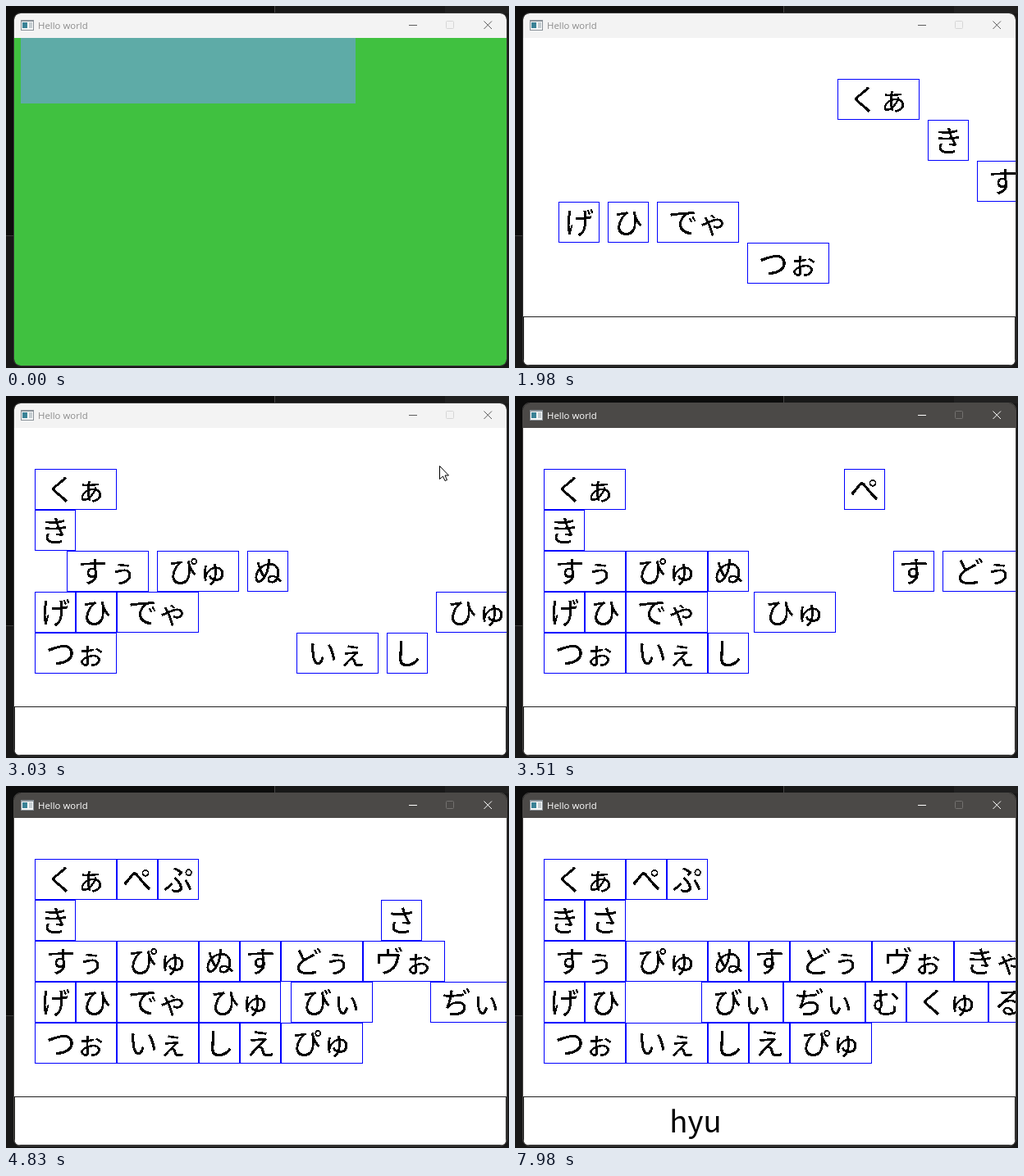
Write an HTML page with a canvas that moves like this. It is 613x442 px and loops after 8000 ms.

```html
<!DOCTYPE html>
<html lang="en">
<head>
<meta charset="utf-8">
<title>Hello world</title>
<style>
  html, body { margin: 0; width: 100%; height: 100%; overflow: hidden; background: #101010; }
  canvas { display: block; }
</style>
</head>
<body>
<canvas id="stage" width="613" height="442"></canvas>
<script>
const ctx = document.getElementById('stage').getContext('2d');
const LOOP = 8000, STEP = 30;
const LEFT = 35, TOP = 89, CELL = 50, GAP = 10;
const SPEED = 0.4655;
const FONT = '36.5px "Noto Sans CJK JP", "Noto Sans CJK", sans-serif';
const LABEL = '11.4px "Open Sans", "Noto Sans", sans-serif';

// Words in spawn order, each followed by its row
const QUEUE = 'げ3 ひ3 でゃ3 つぉ4 くぁ0 き1 すぅ2 ぴゅ2 ぬ2 いぇ4 し4 ひゅ3 ぺ0 す2 どぅ2 ' +
  'ぷ0 え4 ヴぉ2 ぴゅ4 びぃ3 さ1 ぢぃ3 きゃ2 む3 くゅ3 る3';
const REMOVED = { 'でゃ': 5850, 'ひゅ': 7980 };
const TYPED = [[0, ''], [5430, 'd'], [5670, 'dh'], [5850, 'dha'], [7470, 'h'], [7890, 'hy'], [7980, 'hyu']];
const BAR = [[0, 408], [30, 416], [180, 424], [360, 432]];
const SCROLL = [[780, -557], [1980, 0], [3030, 489], [4080, 999], [4830, 1346], [5610, 1709], [8000, 2822]];
const CURSOR = [[2820, 622, 38], [2910, 583, 58], [3030, 528, 85], [3210, 528, 85], [3330, 492, 108]];
const ARROW = new Path2D('M0 0V16L4 12.5L6.5 18L9 17L6.5 11.5H11Z');

// Kana are drawn without smoothing
function sprite(text, w) {
  const c = document.createElement('canvas');
  c.width = w;
  c.height = CELL;
  const g = c.getContext('2d', { willReadFrequently: true });
  g.font = FONT;
  g.textAlign = 'center';
  g.fillText(text, w / 2, 39);
  const img = g.getImageData(0, 0, w, CELL);
  for (let i = 3; i < img.data.length; i += 4) img.data[i] = img.data[i] > 110 ? 255 : 0;
  g.putImageData(img, 0, 0);
  g.strokeStyle = '#00f';
  g.strokeRect(0.5, 0.5, w - 1, CELL - 1);
  return c;
}

function buildWords() {
  const ends = [LEFT, LEFT, LEFT, LEFT, LEFT];
  let start = 53;
  return QUEUE.split(' ').map(item => {
    const text = item.slice(0, -1), row = +item.slice(-1), w = text.length * CELL;
    const word = { row, w, start, stop: ends[row], gone: REMOVED[text] || Infinity, pic: sprite(text, w) };
    ends[row] += w;
    start += w + GAP;
    return word;
  });
}
const words = buildWords();

const latest = (list, t) => list.filter(e => e[0] <= t).pop()[1];

function along(keys, t, k = 1) {
  let i = 1;
  while (i < keys.length - 1 && t > keys[i][0]) i++;
  const a = keys[i - 1], b = keys[i];
  return a[k] + (b[k] - a[k]) * (t - a[0]) / (b[0] - a[0]);
}

function rect(color, x, y, w, h) {
  ctx.fillStyle = color;
  ctx.fillRect(x, y, w, h);
}

function line(color, ...pts) {
  ctx.strokeStyle = color;
  ctx.lineWidth = 1;
  ctx.beginPath();
  for (let i = 0; i < pts.length; i += 4) {
    ctx.moveTo(pts[i], pts[i + 1]);
    ctx.lineTo(pts[i + 2], pts[i + 3]);
  }
  ctx.stroke();
}

function roundPath(x, y, w, h, r) {
  ctx.beginPath();
  ctx.roundRect(x, y, w, h, r);
}

function desktop() {
  rect('#0c0c0c', 0, 0, 613, 442);
  rect('#181818', 327, 0, 286, 442);
  rect('#202020', 535, 0, 78, 9);
  rect('#171717', 0, 281, 327, 161);
  rect('#444', 327, 0, 1, 9);
  rect('#3a3a3a', 0, 280, 10, 1);
}

function titleBar(active) {
  rect(active ? '#4b4947' : '#f3f3f3', 10, 9, 600, 30);
  const ink = active ? '#fff' : '#5c5c5c';
  rect('#8a9299', 18, 17, 16, 13);
  rect('#f4f6f7', 19, 19, 14, 10);
  rect('#3a8296', 20, 20, 6, 7);
  rect('#c4ccd0', 28, 20, 4, 7);
  ctx.font = LABEL;
  ctx.textAlign = 'left';
  ctx.fillStyle = active ? '#fff' : '#8c8c8c';
  ctx.fillText('Hello world', 39, 28);
  line(ink, 491, 23.5, 501, 23.5);
  line(ink, 582.5, 18.5, 592, 28, 592, 18.5, 582.5, 28);
  ctx.strokeStyle = active ? '#73716f' : '#d6d6d6';
  roundPath(536.5, 18.5, 9, 9, 1);
  ctx.stroke();
}

function wordX(word, t) {
  let x = Math.max(word.stop, word.start - along(SCROLL, t));
  for (const o of words)
    if (o.row === word.row && o.stop < word.stop && t >= o.gone)
      x -= Math.min(o.w, 8 + SPEED * (t - o.gone));
  return Math.round(x);
}

function game(t) {
  rect('#fff', 10, 39, 600, 400);
  for (const word of words) {
    if (t >= word.gone) continue;
    const x = wordX(word, t);
    if (x < 610) ctx.drawImage(word.pic, x, TOP + word.row * CELL);
  }
  ctx.strokeStyle = '#202020';
  ctx.strokeRect(10.5, 379.5, 599, 59);
  ctx.font = FONT;
  ctx.textAlign = 'center';
  ctx.fillStyle = '#000';
  ctx.fillText(latest(TYPED, t), 220, 423);
}

function pointer(t) {
  if (t < CURSOR[0][0] || t > CURSOR[CURSOR.length - 1][0]) return;
  ctx.save();
  ctx.translate(Math.round(along(CURSOR, t, 1)) + 0.5, Math.round(along(CURSOR, t, 2)) + 0.5);
  ctx.fillStyle = '#fff';
  ctx.strokeStyle = '#000';
  ctx.fill(ARROW);
  ctx.stroke(ARROW);
  ctx.restore();
}

function draw(t) {
  const active = t >= 3090;
  desktop();
  ctx.save();
  roundPath(10, 9, 600, 430, 8);
  ctx.clip();
  if (t < 780) {
    rect('#40c140', 10, 39, 600, 400);
    rect('#5eaba7', 18, 39, latest(BAR, t), 80);
  } else {
    game(t);
  }
  titleBar(active);
  pointer(t);
  ctx.restore();
  roundPath(9.5, 8.5, 601, 431, 8);
  ctx.strokeStyle = active ? '#4a4846' : '#383838';
  ctx.stroke();
}

function tick(now) {
  draw(Math.floor((now % LOOP) / STEP) * STEP);
  requestAnimationFrame(tick);
}
draw(0);
requestAnimationFrame(tick);
</script>
</body>
</html>
```
